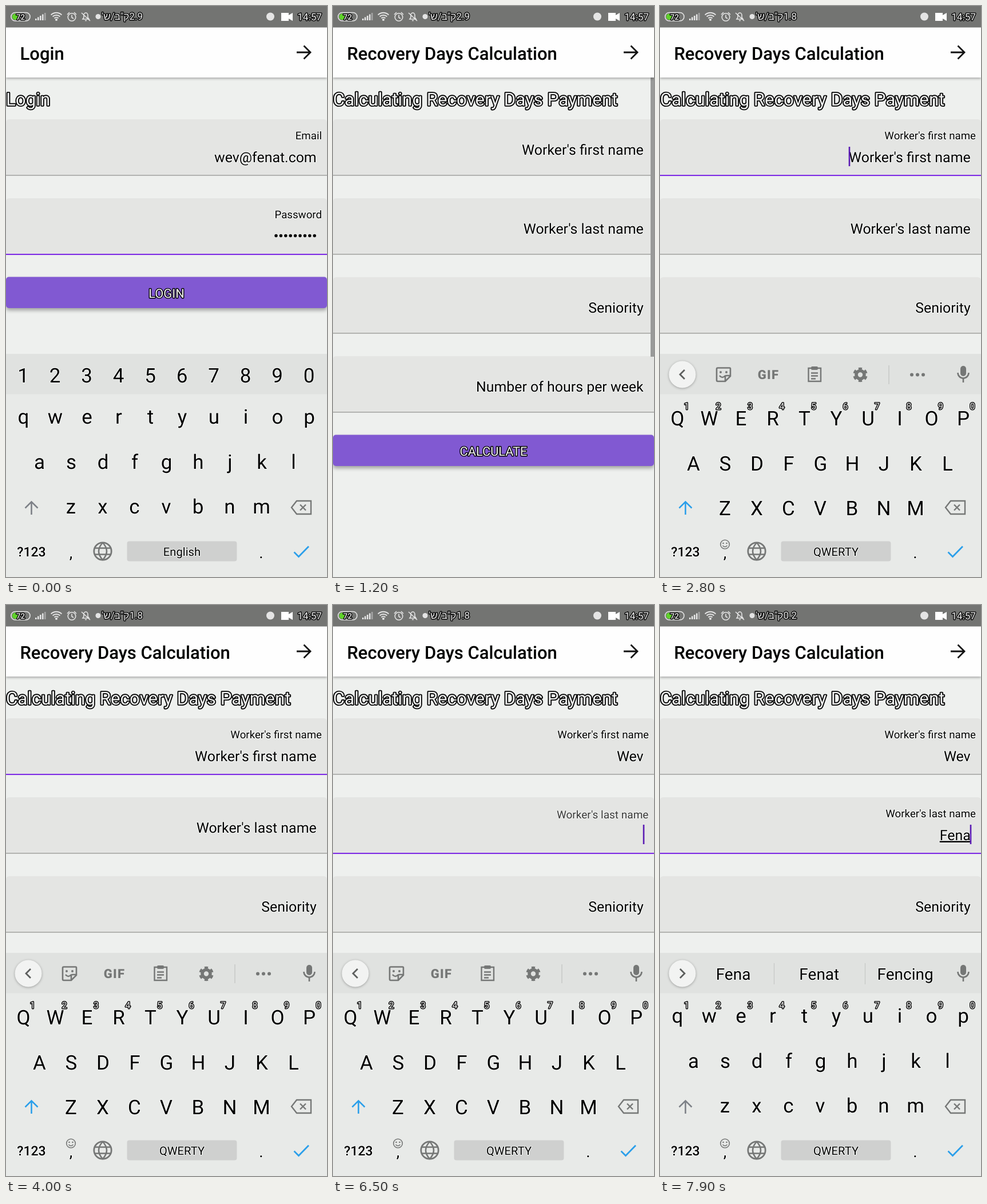
Animation of 561x998 px, one loop 8000 ms. Source, as an HTML page:

```html
<!DOCTYPE html>
<html lang="en">
<head>
<meta charset="utf-8">
<title>Recovery days form</title>
<style>
  html, body { margin: 0; width: 100%; height: 100%; overflow: hidden; background: #eef0ee; }
  svg { display: block; width: 100vw; height: 100vh; }
  text { font-family: Roboto, "Liberation Sans", "DejaVu Sans", sans-serif; paint-order: stroke; stroke-linejoin: round; stroke-width: 2; white-space: pre; text-rendering: geometricPrecision; }
  .dark { fill: #000; stroke: #f8faf8; }
  .light { fill: #f6f6f6; stroke: #000; stroke-width: 2.8; }
  .heading { fill: #f0f1f0; stroke: #000; stroke-width: 3.6; }
  .line { fill: none; stroke: currentColor; }
  .lift { filter: drop-shadow(0 4px 3px rgba(0, 0, 0, .32)); }
  .round { filter: drop-shadow(0 1px 2px rgba(0, 0, 0, .3)); }
</style>
</head>
<body>
<svg id="stage" viewBox="0 0 561 998" preserveAspectRatio="none"></svg>
<script>
const W = 561, H = 998, LOOP = 8000;
const PURPLE = '#7318e4', BLUE = '#2b9fea', GREY = '#757776';
const stage = document.getElementById('stage');

const ramp = (t, from, span) => Math.min(1, Math.max(0, (t - from) / span));
const ease = p => 1 - (1 - p) ** 3;
const mix = (a, b, p) => a + (b - a) * p;
const within = (t, a, b) => t >= a && t < b;
const latest = (t, steps) => steps.reduce((v, [at, s]) => t >= at ? s : v, '');

const text = (s, x, y, size, anchor = 'start', cls = 'dark', extra = '') =>
  `<text class="${cls}" x="${x}" y="${y}" font-size="${size}" text-anchor="${anchor}" ${extra}>${s}</text>`;
const rect = (x, y, w, h, fill, extra = '') =>
  `<rect x="${x}" y="${y}" width="${w}" height="${h}" fill="${fill}" ${extra}/>`;
const line = (d, width = 2, color = GREY, extra = '') =>
  `<path class="line" d="${d}" stroke-width="${width}" color="${color}" ${extra}/>`;
const dot = (x, y, r, fill, extra = '') => `<circle cx="${x}" cy="${y}" r="${r}" fill="${fill}" ${extra}/>`;
const ring = (x, y, r, width, color = GREY, extra = '') =>
  `<circle class="line" cx="${x}" cy="${y}" r="${r}" stroke-width="${width}" color="${color}" ${extra}/>`;
const group = (s, extra) => `<g ${extra}>${s}</g>`;

function statusBar(rate) {
  const pale = '#e4e4e4';
  let s = rect(0, 0, W, 37.5, '#737472');
  s += rect(9, 11.5, 33, 14.5, 'none', `rx="7" stroke="${pale}" stroke-width="1.6"`);
  s += '<path d="M21 13.5H16a5.2 5.2 0 0 0 0 10.500h5z" fill="#5fd12a"/>';
  s += text('72', 25.5, 23.5, 13.5, 'middle', 'light', 'font-weight="500"');
  for (let i = 0; i < 5; i++)
    s += rect(51 + i * 4, 22 - i * 2.5, 2.6, 3 + i * 2.5, i < 4 ? pale : '#a5a5a5');
  for (const r of [5, 9.2, 13.4]) {
    const d = r * .7;
    s += line(`M${88 - d} ${25 - d}A${r} ${r} 0 0 1 ${88 + d} ${25 - d}`, 2, pale);
  }
  s += dot(88, 24, 2, pale);
  s += ring(115, 19.5, 6.8, 1.6, pale) + line('M115 15.500V20l3 2M107 15l4-4M123 15l-4-4', 1.6, pale);
  s += line('M134 23h11l-2-3v-4a3.500 4 0 0 0-7 0v4zM138 25.500h3M132 12l15 14', 1.6, pale);
  s += dot(161, 18.5, 4.5, pale);
  s += text(`${rate}ק"ב/ש'`, 239, 24, 17, 'start', 'light', 'direction="rtl"');
  s += dot(462, 18.5, 7, pale);
  s += '<path d="M481 12h13v4l7-4v14l-7-4v4h-13z" fill="#fff"/>';
  return s + text('14:57', 552, 24.5, 17.2, 'end', 'light');
}

// p: how far the label has floated up
function field(y, label, { p = 0, active = false, body = '', caret = 0 } = {}) {
  let s = `<path d="M0 ${y + 98}V${y + 6}q0-6 6-6H555q6 0 6 6V${y + 98}z" fill="#e4e5e3"/>`;
  s += rect(0, y + 97.2, W, active ? 1.9 : 1.5, active ? PURPLE : '#a0a19f');
  s += text(label, mix(542.7, 552, p), y + mix(62, 35, p), mix(24.9, 18.7, p), 'end', 'dark',
    p > 0 && p < 1 ? 'opacity=".75"' : '');
  s += body;
  if (caret) s += rect(caret - 1.3, y + 48, 2.6, 34, '#5a1bb4');
  return s;
}

const value = (s, y, composing) =>
  text(s, 542.7, y + 74.5, 24.9, 'end', 'dark', composing ? 'text-decoration="underline"' : '');

const button = (label, y, glow = 0) =>
  rect(0, y, W, 54.5, '#8159d2', 'rx="5" class="lift"') +
  (glow ? rect(0, y, W, 54.5, '#fff', `rx="5" opacity="${glow}"`) : '') +
  text(label, 280.5, y + 36, 21.8, 'middle', 'light');

function page(title, heading, content) {
  let s = rect(0, 37, W, H - 37, '#eef0ee') + content;
  s += rect(0, 37, W, 88, '#fefefe', 'style="filter:drop-shadow(0 2px 2px rgba(0,0,0,.3))"');
  s += text(title, 24.5, 94, 31, 'start', 'dark', 'font-weight="500"');
  s += line('M508 81H531M520.500 69.500L532 81L520.500 92.500', 2.8, '#111');
  return s + text(heading, 0, 174, 31.3, 'start', 'heading');
}

function loginPage(t) {
  let dots = '';
  for (let i = 0; i < 9; i++) dots += dot(472 + i * 8.4, 401.5, 2.7, '#000');
  const glow = .25 * ramp(t, 300, 150) * (1 - ramp(t, 450, 200));
  return page('Login', 'Login',
    field(198, 'Email', { p: 1, body: value('wev@fenat.com', 198) }) +
    field(336, 'Password', { p: 1, active: true, body: dots }) +
    button('LOGIN', 473.5, glow));
}

function formPage(t) {
  const first = latest(t, [[4900, 'W'], [5300, 'We'], [5700, 'Wev']]);
  const last = latest(t, [[7000, 'F'], [7400, 'Fe'], [7600, 'Fen'], [7800, 'Fena']]);
  const second = t >= 6350, focused = within(t, 2300, 6350);
  const p1 = ramp(t, 2355, 160), p2 = ramp(t, 6350, 160);

  const blink = t < 2950 || within(t, 3450, 3950) || within(t, 4450, 6300);
  const caret1 = focused && blink ? (first || p1 < 1 ? 543 : 331) : 0;
  const caret2 = second && (t < 6850 || t >= 7000) ? (last || p2 < 1 ? 543 : 333) : 0;
  const body1 = first ? value(first, 198, !second) : p1 === 1 ? value("Worker's first name", 198) : '';
  const body2 = last ? value(last, 336, true) : p2 === 1 ? value("Worker's last name", 336) : '';

  let s = field(198, "Worker's first name", { p: p1, active: focused, body: body1, caret: caret1 }) +
    field(336, "Worker's last name", { p: p2, active: second, body: body2, caret: caret2 }) +
    field(474, 'Seniority') + field(612, 'Number of hours per week') + button('CALCULATE', 749.5);
  const bar = 1 - ramp(t, 1580, 170);
  if (bar) s += rect(555, 125, 6, 488, '#999a99', `opacity="${bar}"`);
  if (t >= 2300) s += rect(0, 610, W, H - 610, '#f7f7f6');
  return page('Recovery Days Calculation', 'Calculating Recovery Days Payment', s);
}

const ROWS = [['qwertyuiop', 30.5, 730], ['asdfghjkl', 58.5, 809], ['zxcvbnm', 113.5, 887]];
const STEP = 55.5;

const mic = rect(525, 629, 10, 18, GREY, 'rx="5"') +
  line('M520.500 641a9.500 9.500 0 0 0 19 0M530 650.500V658', 2.6);
const toggle = d => dot(39, 644, 23.5, '#f2f3f2', 'class="round"') + line(d, 2.8, '#5c5e5d');

const toolbar = () => toggle('M43 636l-8 8l8 8') +
  line('M101 632.500H121.500Q123 632.500 123 634V647L114 656H101Q99 656 99 654V634.500Q99 632.500 101 632.500M123 646H116Q114 646 114 648V656M104 646q5 6 10 0', 2.6) +
  dot(106, 640, 2, GREY) + dot(116, 640, 2, GREY) +
  `<text x="189.500" y="652" font-size="22" font-weight="900" text-anchor="middle" letter-spacing="1.2" fill="${GREY}">GIF</text>` +
  line('M259.500 633H281V656H259.500zM264 641.500H276M264 646.500H276M264 651.500H272', 2.4) +
  rect(264, 630, 12, 6, GREY, 'rx="2"') +
  ring(350, 644.5, 7, 5.6) + ring(350, 644.5, 10.5, 4.6, GREY, 'pathLength="60" stroke-dasharray="5.4 4.6" stroke-dashoffset="-2.3"') +
  line('M400 628V661', 1.3, '#c3c5c3') +
  [440, 450, 460].map(x => dot(x, 644.5, 3, GREY)).join('') + mic;

const suggestions = words => toggle('M35 636l8 8l-8 8') +
  words.split(' ').map((w, i) => text(w, 128 + i * 150.3, 655, 28, 'middle')).join('') +
  line('M199.500 626V663M358.500 626V663', 1.2, '#c6c8c6') + mic;

function popup(key, caps) {
  const [row, x0, y] = ROWS.find(r => r[0].includes(key));
  const x = x0 + row.indexOf(key) * STEP;
  return rect(x - 28, y - 112, 56, 72, '#fbfcfb', 'rx="7" class="round"') +
    text(caps ? key.toUpperCase() : key, x, y - 64, 38, 'middle');
}

function keyboard({ caps, plain, words, pressed }) {
  let s = rect(0, 608, W, 390, '#e8eae8') + rect(0, 608, W, 70.5, '#e0e2e0');
  if (!plain) s += words ? suggestions(words) : toolbar();
  for (let i = 0; i < 10; i++) {
    const n = (i + 1) % 10, x = 30 + i * STEP;
    s += plain ? text(n, x, 658, 35, 'middle') : text(n, x + 16.5, 705, 16, 'middle', 'light');
  }
  for (const [row, x, y] of ROWS)
    [...row].forEach((c, i) => {
      s += text(caps ? c.toUpperCase() : c, x + i * STEP, caps ? y + 3 : y, 35, 'middle');
    });
  s += line('M44.500 889V867M33.500 877.500L44.500 866.500L55.500 877.500', 2.6, caps ? BLUE : '#7d8187');
  s += line('M508 865H533V888H508L499 876.500zM514 871.500l10 10M524 871.500l-10 10', 2.4);
  s += text('?123', 44.5, 962, 23, 'middle', 'dark', 'font-weight="500"');
  s += text(',', 113.5, 965, 28, 'middle') + text('.', 446, 965, 28, 'middle');
  if (!plain)
    s += ring(113.5, 941, 7.8, 1.6) + dot(110.5, 939, 1.3, GREY) + dot(116.5, 939, 1.3, GREY) +
      line('M109.500 943q4 4.500 8 0', 1.5);
  s += ring(169, 953, 15.2, 2.8) +
    line('M169 938q-14 15 0 30q14-15 0-30M155.500 947.500H182.500M155.500 958.500H182.500', 2.5);
  s += rect(211.5, 935.5, 192, 35, '#cfd0cf', 'rx="4"');
  s += text(plain ? 'English' : 'QWERTY', 307.5, 961, 20.2, 'middle');
  s += line('M503.500 954.500L511.500 962.500L529 944.500', 2.8, BLUE);
  return pressed ? s + popup(pressed, caps) : s;
}

// key, press start, release
const PRESSES = [['w', 4800, 4960], ['e', 5270, 5380], ['v', 5600, 5740],
  ['f', 6950, 7090], ['e', 7370, 7470], ['n', 7570, 7670], ['a', 7770, 7870]];
const WORDS = [[5000, 'W We Will'], [5350, 'We He Wedding'], [5700, 'Wev Web Wedding'], [6350, ''],
  [7400, 'Fe He Few'], [7650, 'Fen Ten Fence'], [7800, 'Fena Fenat Fencing']];

function frame(t) {
  const enter = ease(ramp(t, 580, 380));
  let s = enter < 1 ? loginPage(t) : '';
  if (enter > 0)
    s += group(formPage(t), `opacity="${enter}" transform="translate(0 ${80 * (1 - enter)})"`);

  const plain = t < 2000;
  const shift = plain ? ramp(t, 380, 200) ** 2 : 1 - ease(ramp(t, 2430, 260));
  if (shift < 1) {
    const press = PRESSES.find(([, a, b]) => within(t, a, b));
    const caps = within(t, 2000, 5000) || within(t, 6400, 7100);
    s += group(keyboard({ plain, caps, words: latest(t, WORDS), pressed: press && press[0] }),
      `transform="translate(0 ${390 * shift})"`);
  }
  return s + statusBar(t < 2800 ? '2.9' : t < 6900 ? '1.8' : '0.2');
}

let shown = '';
const start = performance.now();
function tick() {
  const next = frame((performance.now() - start) % LOOP);
  if (next !== shown) stage.innerHTML = shown = next;
  requestAnimationFrame(tick);
}
tick();
</script>
</body>
</html>
```
